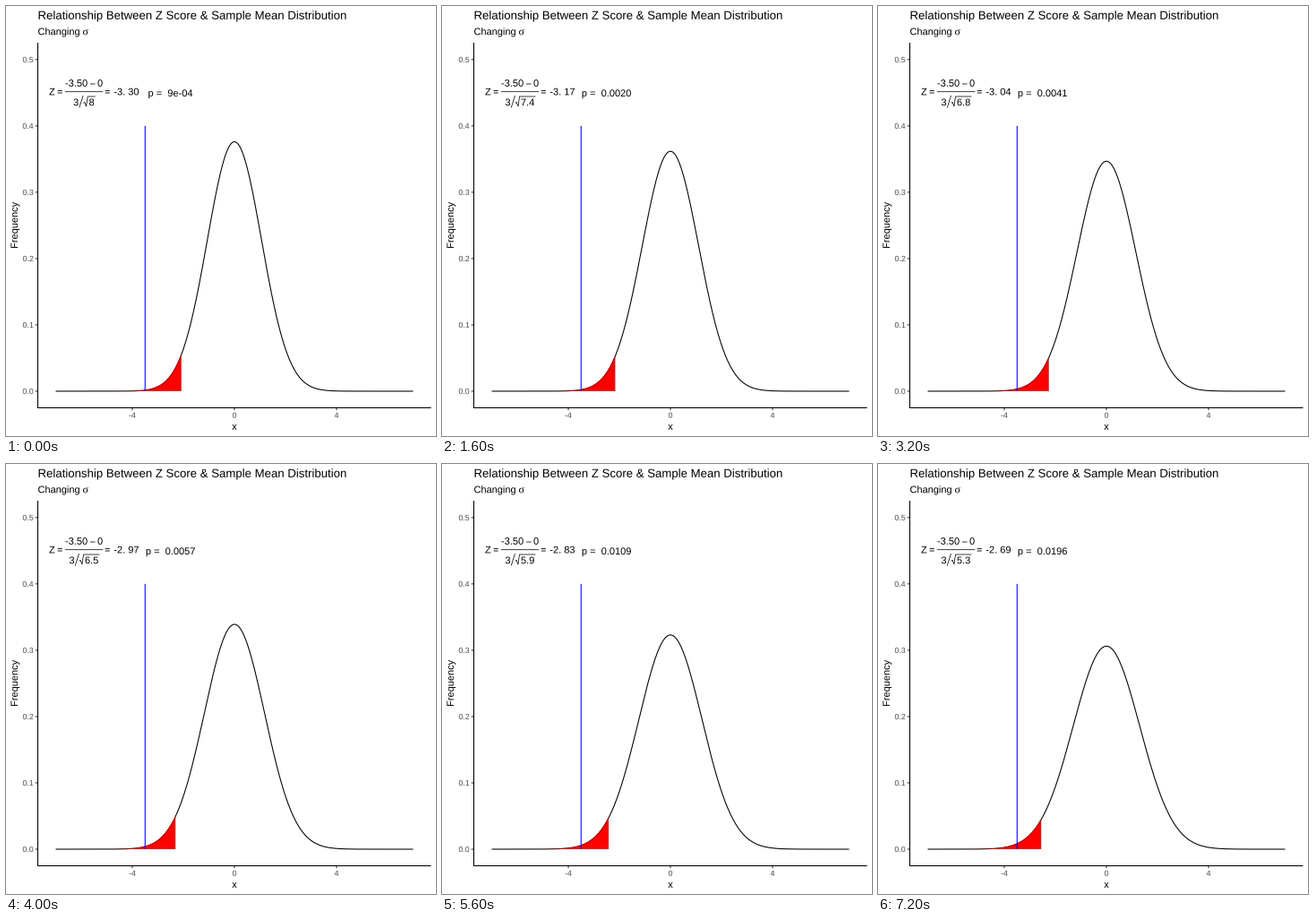
These frames come from a looping animation (480x480 px, 8000 ms). A matplotlib script:

```python
import math

import matplotlib.pyplot as plt
import numpy as np
from matplotlib.animation import FuncAnimation
from matplotlib.patches import PathPatch
from matplotlib.textpath import TextPath
from matplotlib.transforms import Affine2D

SIZE = 480
DPI = 72
FRAMES = 10
INTERVAL = 800
MEAN = -3.5
SIGMA = 3
LINE = 1.07   # plot lines, px
THIN = 0.75   # formula rules, px
NOTE = 11.04  # annotation font size, px

plt.rcParams["font.family"] = "Liberation Sans"

fig = plt.figure(figsize=(SIZE / DPI, SIZE / DPI), dpi=DPI, facecolor="white")
ax = fig.add_axes([0, 0, 1, 1])
ax.set_xlim(0, SIZE)
ax.set_ylim(SIZE, 0)
ax.axis("off")


def px(x):
    return 255 + 28.5 * x


def py(y):
    return 430 - 740.4 * y


def line(xs, ys, width=LINE, color="black", z=2):
    return ax.plot(xs, ys, color=color, lw=width, zorder=z, snap=False,
                   solid_capstyle="butt")[0]


def text_path(x, y, text, size=11, align=0, angle=0, family="Liberation Sans"):
    """Text outline; align 0, 0.5 or 1 puts its left, centre or right at x."""
    path = TextPath((0, 0), text, size=size, prop={"family": family})
    if align:
        box = path.get_extents()
        path = Affine2D().translate(
            -box.x0 - align * box.width, 0).transform_path(path)
    place = Affine2D().rotate_deg(angle).scale(1, -1).translate(x, y)
    return place.transform_path(path)


def label(*args, color="black", **kw):
    patch = PathPatch(text_path(*args, **kw), fc=color, lw=0, zorder=5,
                      snap=False)
    return ax.add_patch(patch)


def density(x, sd):
    return np.exp(-0.5 * (x / sd) ** 2) / (sd * math.sqrt(2 * math.pi))


def p_text(p):
    p = round(p, 4)
    return f"{p:.0e}" if p < 0.001 else f"{p:.4f}"


def draw_axes():
    line([35.5, 35.5], [41, 449])
    line([35, 474.5], [448.5, 448.5])
    for i in range(6):
        y = py(i / 10)
        line([32.75, 35], [y, y], color="#333333")
        label(30.3, y + 3.1, f"{i / 10:.1f}", 8.8, align=1, color="#4d4d4d")
    for v in (-4, 0, 4):
        x = px(v)
        line([x, x], [449, 451.25], color="#333333")
        label(x, 459.8, str(v), 8.8, align=0.5, color="#4d4d4d")
    label(255, 473, "x", align=0.5)
    label(13, 244.4, "Frequency", align=0.5, angle=90)


def draw_titles():
    label(35.5, 14.8, "Relationship Between Z Score & Sample Mean Distribution",
          13.2)
    label(35.5, 32.2, "Changing")
    label(85.5, 32.2, "σ", 12, family="Liberation Serif")


def draw_formula():
    label(48, 99.4, "Z", NOTE)
    for x in (57.6, 110.7):
        for y in (94.6, 97):
            line([x, x + 5.1], [y, y], 0.9)
    label(66, 89.8, f"{MEAN:.2f}", NOTE)
    line([94, 99.5], [87, 87], 0.8)
    label(102, 89.8, "0", NOTE)
    line([66, 108.2], [95.7, 95.7], THIN)


draw_axes()
draw_titles()
draw_formula()

curve = line([], [], z=1)
area = ax.fill([0, 0], [0, 0], color="red", lw=0, zorder=3)[0]
line([px(MEAN)] * 2, [py(0), py(0.4)], color="blue", z=4)

three, radicand, z_label, p_label = (label(0, 0, "0") for _ in range(4))
slash = line([], [], THIN)
radical = line([], [], THIN)

grid = np.linspace(-7, 7, 281)


def set_denominator(n):
    text = f"{n:g}"
    body = NOTE * (0.556 if len(text) == 1 else 1.39)
    left = 87.4 - (18.6 + body) / 2
    root = left + 11.5
    three.set_path(text_path(left, 111.2, str(SIGMA), NOTE))
    slash.set_data([left + 6.8, left + 11.1], [113.5, 100])
    radical.set_data(
        [root, root + 1.2, root + 3, root + 4.6, root + 7.1 + body],
        [108.5, 107.3, 112, 101, 101])
    radicand.set_path(text_path(root + 6, 111.2, text, NOTE))


def update(i):
    n = round(8 - 0.3 * i, 1)
    sd = SIGMA / math.sqrt(n)
    curve.set_data(px(grid), py(density(grid, sd)))

    tail = np.linspace(-7, -1.96 * sd, 120)
    xs = np.concatenate([tail, [tail[-1], tail[0]]])
    ys = np.concatenate([density(tail, sd), [0, 0]])
    area.set_xy(np.column_stack([px(xs), py(ys)]))

    set_denominator(n)
    whole, digits = f"{MEAN / sd:.2f}".split(".")
    z_label.set_path(text_path(120.3, 99.4, f"{whole}. {digits}", NOTE))
    # The displayed p uses the variance as the spread.
    p = 0.5 * math.erfc(-MEAN / sd ** 2 / math.sqrt(2))
    p_label.set_path(
        text_path(px(-2.5), 101, f"p =  {p_text(p)}", NOTE, align=0.5))
    return area, curve, three, slash, radical, radicand, z_label, p_label


anim = FuncAnimation(fig, update, frames=FRAMES, interval=INTERVAL,
                     repeat=True, repeat_delay=0)
plt.show()
```
